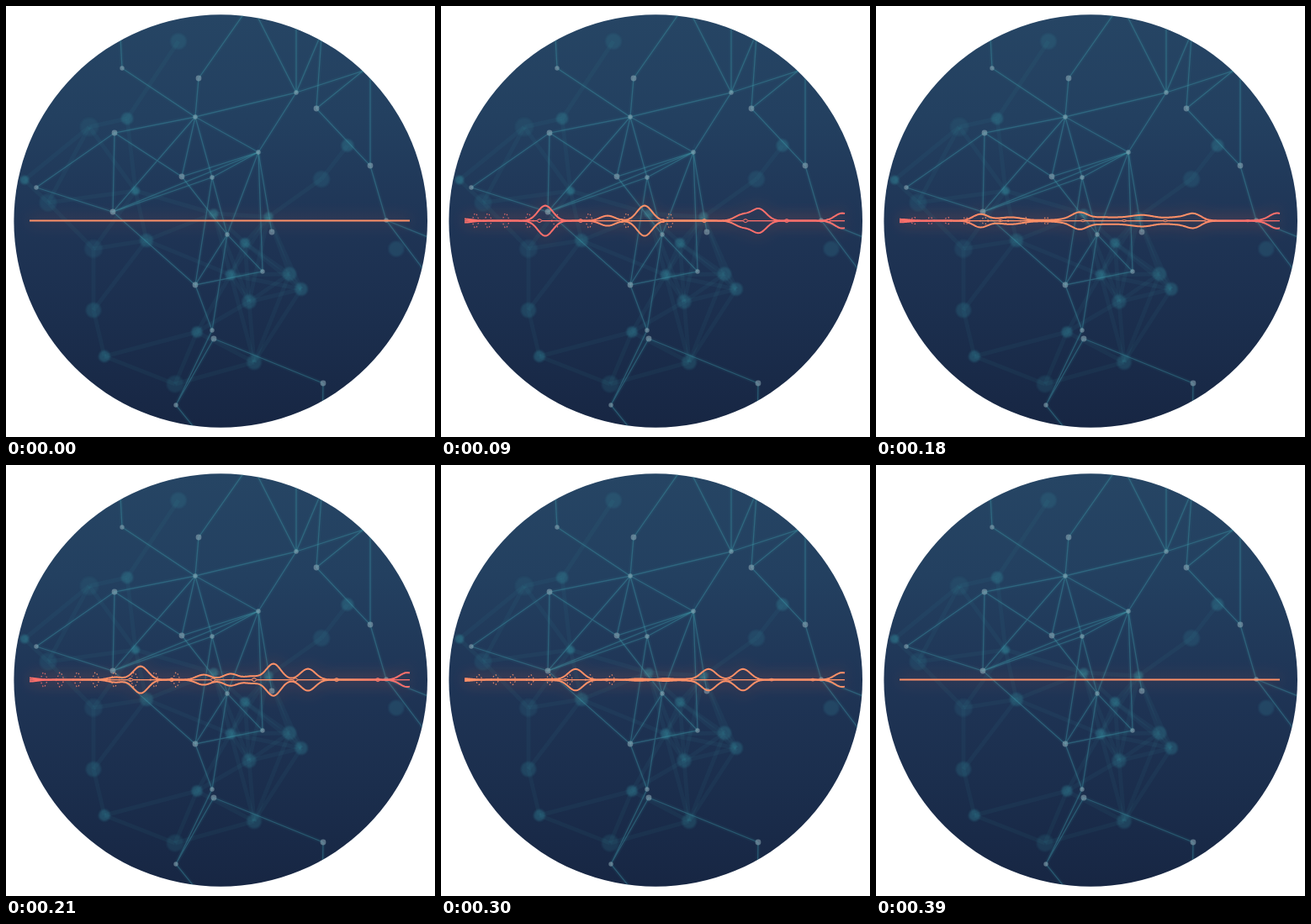
An HTML page with a canvas that plays this animation: 510 px wide and 513 px high, repeating every 420 ms.

```html
<!DOCTYPE html>
<html lang="en">
<head>
<meta charset="utf-8">
<title>Voice wave</title>
<style>
  html, body { margin: 0; width: 100%; height: 100%; overflow: hidden; background: #fff; }
  canvas { display: block; }
</style>
</head>
<body>
<canvas id="stage" width="510" height="513"></canvas>
<script>
const stage = document.getElementById('stage');
const ctx = stage.getContext('2d');
const LOOP = 420, STEP = 30, LEFT = 28, RIGHT = 480, MID = 255.6;

// Key points of the network, trails through them, and angles of rays leaving the disc
const nodes = [
  [138, 74], [229, 86], [225, 132], [129, 151], [345, 103], [369, 122], [300, 174],
  [209, 203], [245, 204], [433, 190], [36, 216], [127, 245], [263, 272], [316, 269],
  [305, 316], [225, 332], [245, 386], [247, 396], [202, 475], [377, 449], [452, 255]
];
const trails = [
  [0, 2, 4, 6, 11, 15, 14, 6, 12, 16, 18, 17, 19], [1, 2, 6, 7, 3, 11, 2, 7, 12, 15, 16],
  [10, 11, 8, 12, 14], [10, 3, 2, 8, 15], [13, 6, 8], [5, 9, 20]
];
const rays = [
  [0, -93], [1, -55], [4, -117, -90, -67, -18], [5, -86, -39], [9, -90], [18, 51], [19, 91], [20, 22, 53]
];
// Blurred dots, from small and clear to large and faint
const haze = [
  [154, 220], [22, 207], [247, 247], [312, 251], [284, 282], [267, 320], [227, 388], [117, 417],
  [144, 134], [406, 166], [351, 337], [167, 279], [337, 319], [289, 352], [295, 424], [104, 362],
  [464, 289], [205, 42], [375, 206], [201, 450], [50, 234], [104, 289], [99, 144]
];

// Two bursts of sound: crests as [x, height]
const bursts = [
  { start: 0, peak: 90, end: 210, bead: 117, spark: x => 41 + 12 * x + 3 * x * x,
    crests: [[124, 18], [198, 6], [242, 18], [358, 7], [378, 14], [477, 9]] },
  { start: 150, peak: 210, end: 390, bead: 148, spark: x => 45 + 19 * x + x * x / 2,
    crests: [[130, 3], [160, 16], [235, 6], [267, 7], [292, 4], [318, 19], [359, 13], [477, 8.5]] }
];

const clamp = v => Math.min(1, Math.max(0, v));
const mix = (a, b, k) => a + (b - a) * k;
const bell = (x, c, h, w) => h * Math.exp(-(((x - c) / w) ** 2) / 2);
const range = n => [...Array(n).keys()];

function line(g, points) {
  g.beginPath();
  points.forEach(p => g.lineTo(...p));
  g.stroke();
}

function dot(g, [x, y], r) {
  g.beginPath();
  g.arc(x, y, r, 0, Math.PI * 2);
  g.fill();
}

function makeBackdrop() {
  const c = document.createElement('canvas');
  c.width = stage.width;
  c.height = stage.height;
  const g = c.getContext('2d');
  g.fillStyle = '#fff';
  g.fillRect(0, 0, c.width, c.height);
  const sky = g.createLinearGradient(0, 10, 0, 502);
  ['#264564', '#234060', '#1f3556', '#1b2e4d', '#172643'].forEach((s, i) => sky.addColorStop(i / 4, s));
  g.fillStyle = sky;
  dot(g, [255.2, 256], 245.8);
  g.clip();

  const paths = trails.map(t => t.map(i => nodes[i]));
  for (const [i, ...angles] of rays) {
    const [x, y] = nodes[i];
    for (const a of angles.map(d => d * Math.PI / 180)) {
      paths.push([[x, y], [x + 130 * Math.cos(a), y + 130 * Math.sin(a)]]);
    }
  }

  g.strokeStyle = 'rgba(56,140,156,.08)';
  g.lineWidth = 5;
  paths.forEach(p => line(g, p));
  haze.forEach((a, i) => haze.slice(i + 1).forEach(b => {
    if (Math.hypot(a[0] - b[0], a[1] - b[1]) < 115) line(g, [a, b]);
  }));

  g.filter = 'blur(1px)';
  haze.forEach((p, i) => {
    g.fillStyle = `rgba(50,136,154,${mix(.48, .12, i / haze.length)})`;
    dot(g, p, 5 + i * .27);
  });
  g.filter = 'none';

  g.strokeStyle = 'rgba(64,156,170,.38)';
  g.lineWidth = 1.3;
  paths.forEach(p => line(g, p));
  g.fillStyle = 'rgba(145,172,184,.55)';
  nodes.forEach((p, i) => dot(g, p, i % 2 ? 3.4 : 2.7));
  return c;
}

// A burst swells, sharpens, then its tall crests sink while the small ones vanish
function burstState({ start, peak, end, crests }, t) {
  const rise = clamp((t - start) / (peak - start));
  const fade = 1 - clamp((t - peak) / (end - peak)) ** 1.6;
  const width = mix(19, 8.8, rise);
  const swell = 18 * rise * rise * (1 - rise);
  const size = h => rise * rise * (h < 8 ? h * fade ** 4 : Math.min(h, 19 * fade));
  const height = x => crests.reduce((y, [c, h]) => y + bell(x, c, size(h), width),
    bell(x, LEFT, 2 * rise * fade, width) + bell(x, 285, swell, 50));
  return { height, level: rise * fade };
}

function mirrored(height, from = LEFT, to = RIGHT) {
  const xs = range(to - from + 1).map(i => from + i);
  for (const side of [-1, 1]) line(ctx, xs.map(x => [x, MID + side * height(x)]));
}

// Red ends close in on an orange middle
function wavePaint(t) {
  const warm = t < 90 ? mix(300, 50, t / 90) : mix(50, 300, (t - 90) / 300);
  const paint = ctx.createLinearGradient(LEFT, 0, RIGHT, 0);
  const stop = (offset, color) => paint.addColorStop(clamp((226 + offset) / (RIGHT - LEFT)), color);
  stop(-warm - 60, '#ff706c');
  stop(-warm, '#ff9168');
  stop(warm, '#ff9168');
  stop(warm + 60, '#ff706c');
  return paint;
}

const backdrop = makeBackdrop();

function draw(t) {
  const states = bursts.map(b => burstState(b, t));
  const lead = states[1].level > states[0].level ? 1 : 0;
  const { bead, spark } = bursts[lead];
  const { level } = states[lead];

  ctx.drawImage(backdrop, 0, 0);
  ctx.save();
  ctx.strokeStyle = wavePaint(t);
  ctx.shadowColor = 'rgba(255,100,60,.55)';
  ctx.shadowBlur = 18;
  ctx.lineWidth = 2;
  if (level) {
    mirrored(x => states.reduce((y, s) => y + s.height(x), 0));
    ctx.shadowBlur = 0;
    ctx.lineWidth = 1.2;
    ctx.globalAlpha = .85;
    mirrored(x => bell(x, bead + 49 * Math.max(0, Math.round((x - bead) / 49)), 2 * level, 1.6));
    if (level > .7 || lead) ctx.setLineDash([1.6, 2.6]);
    for (const c of range(8).map(spark)) {
      mirrored(x => bell(x, c, 9 * level, 2.2), Math.round(c) - 6, Math.round(c) + 6);
    }
  } else {
    line(ctx, [[LEFT, MID], [RIGHT, MID]]);
  }
  ctx.restore();
}

function tick() {
  draw(Math.floor(performance.now() % LOOP / STEP) * STEP);
  requestAnimationFrame(tick);
}
tick();
</script>
</body>
</html>
```
